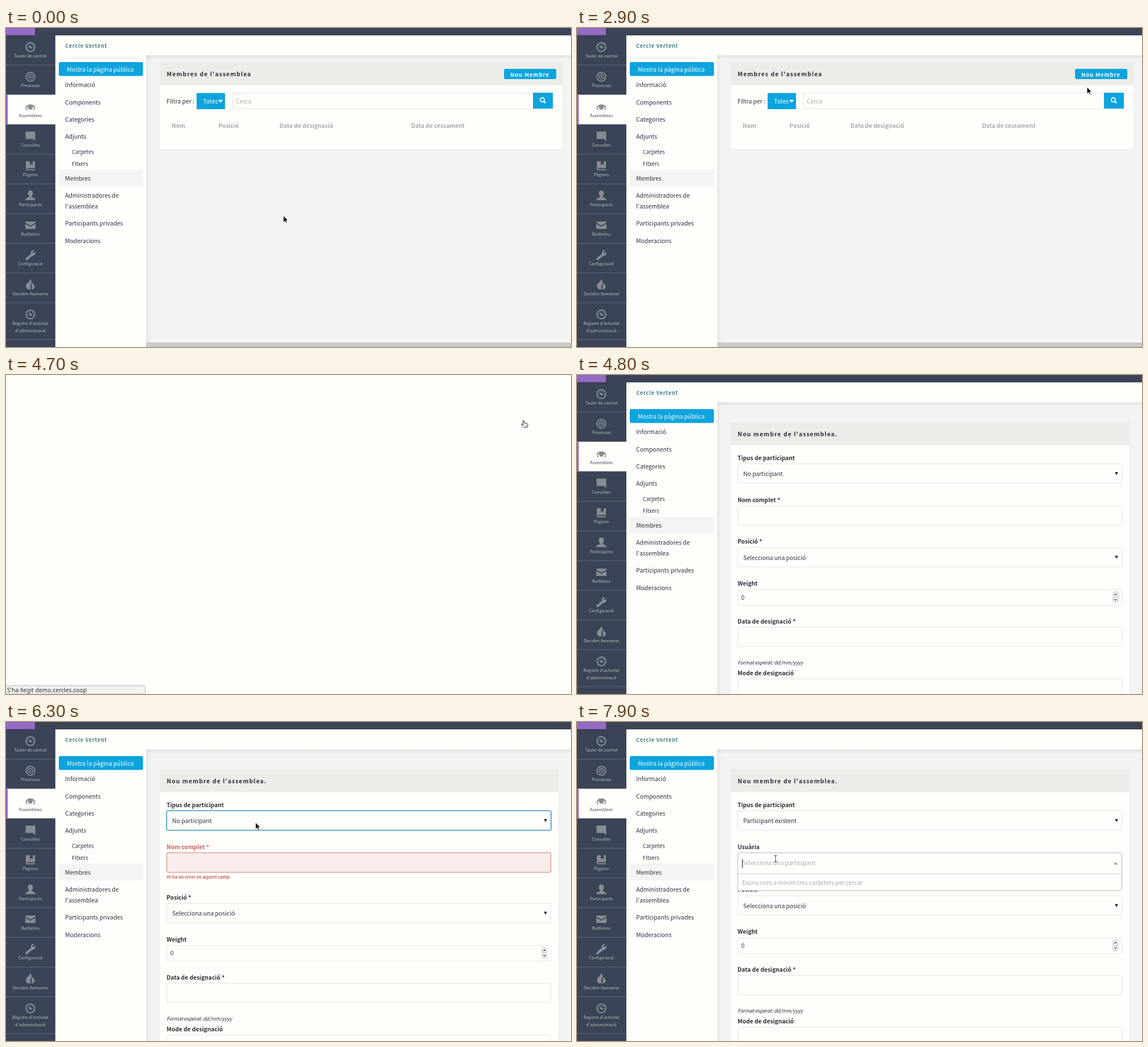
Recreate the animation shown at these times as an HTML page. Size 996 px wide and 562 px high, loop 8000 ms.

```html
<!DOCTYPE html>
<html lang="ca">
<head>
<meta charset="utf-8">
<title>Membres de l'assemblea</title>
<style>
html, body { margin: 0; width: 100%; height: 100%; overflow: hidden; background: #fefffb; }
svg { display: block; width: 100%; height: 100%; }
text { font: 10.42px 'Noto Sans CJK JP', 'Noto Sans CJK SC', 'Noto Sans', sans-serif; fill: #2c2f38; white-space: pre; }
.bold { font-weight: 700; font-size: 10.24px; }
.heading { font-weight: 700; font-size: 10.42px; letter-spacing: 1.06px; }
.crumb { font-weight: 700; font-size: 9.13px; letter-spacing: .75px; fill: #437a83; }
.button { font-weight: 700; font-size: 9.4px; letter-spacing: 1px; fill: #fefffb; }
.small { font-size: 9.39px; }
.nav { font-size: 7.3px; fill: #b9bcc2; text-anchor: middle; }
.white { fill: #fefffb; }
.grey { fill: #a9aaa8; }
.error { fill: #c9605f; }
.note { font-weight: 700; font-size: 7.55px; fill: #c9605f; }
.hint { font-size: 8.9px; font-style: italic; letter-spacing: -.2px; }
.status { font: 10.35px 'Noto Sans', 'Open Sans', sans-serif; fill: #303030; }
</style>
</head>
<body>
<svg id="stage" viewBox="0 0 996 562" preserveAspectRatio="none"></svg>
<script>
const LOOP = 8000, TICK = 100;
const PAPER = '#fefffb', BLUE = '#0da4de', NAVY = '#3b4356', LINE = '#e3e4e1', FOCUS = '#2b8cb4';
const stage = document.getElementById('stage');

const rect = (x, y, w, h, fill, extra = '') =>
  `<rect x="${x}" y="${y}" width="${w}" height="${h}" fill="${fill}" ${extra}/>`;
const text = (x, y, s, cls = '') => `<text x="${x}" y="${y}" class="${cls}">${s}</text>`;
const path = (d, fill, extra = '') => `<path d="${d}" fill="${fill}" ${extra}/>`;
const at = (x, y, body) => `<g transform="translate(${x} ${y})">${body}</g>`;
const stroke = (color, width = 1) => `stroke="${color}" stroke-width="${width}"`;

// Sidebar icons, each centred on 0,0
const GREY = '#888c95';
const ring = (r, w) => `<circle r="${r}" fill="none" ${stroke(GREY, w)}/>`;
const gauge = ring(7.8, 2) + path('M-4.5-3.5L1.5-1A2 2 0 1 1-1.2 1.6Z', GREY) +
  [[-5, 1], [0, -5], [4, -3.4], [5, 1]].map(([x, y]) => `<circle cx="${x}" cy="${y}" r="1" fill="${GREY}"/>`).join('');
const icons = [
  gauge,
  ring(7.8, 2) + ring(4.2, 1.6) + `<circle r="1.8" fill="${GREY}"/>`,
  path('M-8 3A8.6 8.6 0 0 1 8 3', 'none', stroke(GREY, 2.2)) +
    path('M-4.5 2A4.5 4.5 0 0 1 4.5 2L2 5.5H-2Z', GREY) + path('M-8 4L-5 6.5M8 4L5 6.5', 'none', stroke(GREY, 1.6)),
  path('M-8.5-8H8.5V9L4.5 5H-8.5Z', GREY),
  path('M-8-8H-1V-1L1.5-3 4-1V-8H8V4H-6V6H8V8H-6Q-8 8-8 6Z', GREY),
  path('M0-9C6-9 5-1 2.5 1V3Q9 4 9 8H-9Q-9 4-2.5 3V1C-5-1-6-9 0-9Z', GREY),
  path('M-9-6.5H9V-4.5L0 .5-9-4.5ZM-9-2.5L0 2.5 9-2.5V6.5H-9Z', GREY),
  path('M-8.5 6L1-2Q0-7 4-8.5 6-9 7-8L3.5-5 5.5-3 9-6Q10 1 3 2L-5.5 9Q-10 10-8.5 6Z', GREY),
  path('M-1-9.5C6-5-1 0 0 4Q1 7-1 8.5-8 8-8 2-7-2-4-4-1-6-1-9.5ZM4-4C4 0 9 1 7.5 5Q6 8.5 1 8.5C5 4 0 2 4-4Z', GREY),
  gauge
];
const navItems = ['Tauler de control', 'Processos', 'Assemblees', 'Consultes', 'Pàgines', 'Participants',
  'Butlletins', 'Configuració', 'Decidim Awesome', "Registre d'activitat"];
const ROW = 52.33;

function sidebar() {
  let out = rect(0, 0, 996, 13, NAVY) + rect(0, 0, 51, 12.5, '#966bc7') + rect(0, 13, 87, 549, NAVY);
  navItems.forEach((label, i) => {
    const y = 13 + ROW * i, active = i === 2;
    if (active) out += rect(0, y, 87, ROW, PAPER) + rect(0, y, 3, ROW, '#966bc7');
    out += at(43, y + 20.5, icons[i]);
    out += `<text x="43" y="${y + 39}" class="nav" ${active ? 'style="fill:#3b4356"' : ''}>${label}</text>`;
    out += rect(0, i === 9 ? 548.5 : y + ROW - .5, 87, 1, '#636a79');
  });
  return out + text(43, 535.5, "d'administració", 'nav');
}

function menu() {
  const items = [['Informació', 104], ['Components', 134.5], ['Categories', 165], ['Adjunts', 195],
    ['Membres', 269], ['Administradores de', 299], ["l'assemblea", 318],
    ['Participants privades', 348], ['Moderacions', 378.5]];
  return rect(93, 60, 148.5, 24.5, BLUE, 'rx="3"') + text(107.3, 77, 'Mostra la pàgina pública', 'white') +
    rect(93, 249.5, 148.5, 29.5, '#f4f5f2', 'rx="2"') +
    items.map(([s, y]) => text(104.3, y, s)).join('') +
    text(116, 221.5, 'Carpetes', 'small') + text(116, 242.5, 'Fitxers', 'small');
}

const shell = `<defs>
  <linearGradient id="down" x2="0" y2="1"><stop stop-opacity=".07"/><stop offset="1" stop-opacity="0"/></linearGradient>
  <linearGradient id="right"><stop stop-opacity=".05"/><stop offset="1" stop-opacity="0"/></linearGradient></defs>` +
  rect(0, 0, 996, 562, PAPER) + rect(247, 48, 749, 514, '#f3f4f1') +
  rect(247, 48, 749, 8, 'url(#down)') + rect(247, 48, 8, 514, 'url(#right)') +
  sidebar() + text(104.3, 35, 'Cercle Vertent', 'crumb') + menu();

function card(x, y, w, h, head, title) {
  return rect(x - .5, y, w + 1, h + 1, '#e9eae7') + rect(x, y, w, h, PAPER) +
    rect(x, y, w, head, '#ecede9') + text(283.3, y + head / 2 + 4.3, title, 'heading');
}

function listPage(hover, focused) {
  const mix = (a, b) => Math.round(a + (b - a) * hover);
  const color = `rgb(${mix(13, 11)},${mix(164, 134)},${mix(222, 180)})`;
  const columns = [['Nom', 292], ['Posició', 374.5], ['Data de designació', 482], ['Data de cessament', 714]];
  return card(271, 60, 710, 154, 41, "Membres de l'assemblea") +
    (focused ? rect(876, 70.5, 95, 21, 'none', stroke('#8b9aa2') + ' stroke-dasharray="1 1"') : '') +
    rect(878, 72, 92, 18, color, 'rx="2.5"') + text(889, 86, 'Nou Membre', 'button') +
    text(283, 133, 'Filtra per :') + rect(336, 114.5, 50, 28.5, BLUE) + text(347.3, 133, 'Totes', 'white') +
    path('M374 126.5H382.5L378.2 131.5Z', PAPER) +
    rect(399.5, 114.5, 530, 27.5, PAPER, stroke(LINE)) + text(405, 132.5, 'Cerca', 'grey') +
    rect(929, 114, 35, 28, BLUE) +
    `<circle cx="945.5" cy="126.5" r="3.6" fill="none" ${stroke(PAPER, 1.7)}/>` +
    path('M948.2 129.2L951.3 132.2', 'none', stroke(PAPER, 2)) +
    columns.map(([s, x]) => text(x, 176, s, 'bold grey')).join('') +
    rect(247, 554, 749, 8, '#c9cac8');
}

function field(y, h, state = '') {
  const glow = state === 'focus' ? rect(282.5, y - .5, 679, h + 1, 'none', stroke('#b5d8e6', 2.2) + ' rx="3"') : '';
  const line = { focus: FOCUS, error: '#cd7573' }[state] || LINE;
  return glow + rect(283.5, y, 677, h, state === 'error' ? '#f9edeb' : PAPER, stroke(line) + ' rx="2"');
}
const select = (y, value, state) => field(y, 34, state) + text(293, y + 21.5, value) +
  path(`M948 ${y + 14.5}H954L951 ${y + 20}Z`, '#30333a');

function spinner(y) {
  const half = (dy, d) => at(949.3, y + dy, rect(-4.5, -4.4, 9, 8.8, '#fafaf8', stroke('#a9a9a9', .8) + ' rx="2.5"') +
    path(d, 'none', stroke('#333', 1.1)));
  return half(8.8, 'M-2.2 1L0-1.2 2.2 1') + half(17.8, 'M-2.2-1L0 1.2 2.2-1');
}

function formPage({ user, error, typeFocus, nameFocus, open }) {
  const shift = user ? 2.3 : error ? 15.7 : 0;
  const rest = text(283, 297, 'Posició *', 'bold') + select(304, 'Selecciona una posició') +
    text(283, 371, 'Weight', 'bold') + field(378, 27.5) + text(289.5, 395.5, '0') + spinner(378) +
    text(283, 438, 'Data de designació *', 'bold') + field(444.5, 34) +
    text(283, 510, 'Format esperat: dd/mm/yyyy', 'hint') +
    text(283, 529, 'Mode de designació', 'bold') + field(535.5, 34);
  let out = card(271, 83, 702, 490, 40.5, "Nou membre de l'assemblea.") + text(283, 150, 'Tipus de participant', 'bold') +
    select(156.5, user ? 'Participant existent' : 'No participant', typeFocus && 'focus') + at(0, shift, rest);
  if (!user) {
    out += text(283, 223.5, 'Nom complet *', error ? 'bold error' : 'bold') +
      field(230.3, 34.5, error ? 'error' : nameFocus ? 'focus' : '') +
      (error ? text(283, 276, 'Hi ha un error en aquest camp.', 'note') : '');
    return out;
  }
  out += text(283, 223.5, 'Usuària', 'bold');
  out += rect(283.5, 230.5, 677, open ? 66.5 : 35.5, PAPER, stroke(open ? '#b9bab8' : '#cfd0ce') + ' rx="2"');
  out += text(291, 252, 'Selecciona una participant', 'grey');
  out += path(open ? 'M945.5 251H953L949.2 247Z' : 'M945.5 247H953L949.2 251Z', '#999');
  if (open) {
    out += rect(284, 267, 676, 1, '#cfd0ce') + rect(291, 241.5, 1, 16, '#222') +
      text(291, 286.5, 'Escriu com a mínim tres caràcters per cercar', 'grey');
  }
  return out;
}

const statusBar = (s, w) => path(`M0 547.5H${w - 3}Q${w} 547.5 ${w} 550.5V562H0Z`, '#f2f2ef', stroke('#b8b9b6')) +
  text(2, 559, s, 'status');

const pointers = {
  arrow: path('M0 0V12L2.8 9.4 4.6 13.4 6.4 12.6 4.7 8.7H8.3Z', '#111', stroke('#fff', .7)),
  hand: path('M-1 1Q0-1 1.2.6L2 4.6 6.4 5.6Q8.3 6 8 8L7.4 11Q7 12.6 5.6 12.6H1.6Q.4 12.6-.4 11.4L-3.4 7.6Q-4 6-2.2 6.4L0 7.6Z',
    '#fff', stroke('#222')) + path('M2.5 8V10.5M4.3 8V10.5M6 8.2V10.5', 'none', stroke('#555', .6)),
  beam: path('M-2.5-5.5H2.5M0-5.5V5.5M-2.5 5.5H2.5', 'none', stroke('#333'))
};

// Pointer stops: time, x, y
const track = [[0, 489, 330.5], [1000, 489, 330.5], [1200, 548, 338], [1500, 639, 328], [2100, 639, 328],
  [2400, 770, 210], [2700, 880, 111], [2800, 884, 110], [2900, 899, 104], [3100, 904, 97], [3200, 904, 97],
  [3600, 912, 80], [4800, 912, 80], [4801, 911, 84], [5500, 911, 84], [5800, 690, 150], [6000, 539, 180],
  [6300, 440, 177], [6400, 430, 178], [6600, 379, 221], [7500, 379, 221], [7800, 350, 241], [8000, 350, 241]];

function pointer(t) {
  if (t >= 4800 && t < 5400) return '';
  const i = track.findIndex(stop => stop[0] > t);
  const [t0, x0, y0] = track[i - 1], [t1, x1, y1] = track[i];
  const k = (t - t0) / (t1 - t0);
  const shape = t >= 7700 ? 'beam' : t >= 3400 && t < 4800 ? 'hand' : 'arrow';
  return at(x0 + (x1 - x0) * k, y0 + (y1 - y0) * k, pointers[shape]);
}

function scene(t) {
  const loaded = statusBar("S'ha llegit demo.cercles.coop", 245.5);
  if (t >= 4600 && t < 4800) return rect(0, 0, 996, 562, PAPER) + loaded;
  if (t >= 4800) {
    return shell + formPage({
      user: t >= 7100, error: t >= 6300, nameFocus: t >= 5100,
      typeFocus: t >= 6300 && t < 7800, open: t >= 7800
    });
  }
  const hover = Math.min(1, Math.max(0, (t - 3300) / 300));
  const status = t >= 4400 ? loaded
    : t >= 3500 ? statusBar('https://demo.cercles.coop/admin/assemblies/cercle-vertent/members/new', 368.5) : '';
  return shell + listPage(hover, t >= 3800) + status;
}

const start = performance.now();
let last = -1;
function update() {
  const t = Math.floor((performance.now() - start) % LOOP / TICK) * TICK;
  if (t !== last) stage.innerHTML = scene(t) + pointer(t);
  last = t;
  requestAnimationFrame(update);
}
update();
</script>
</body>
</html>
```
